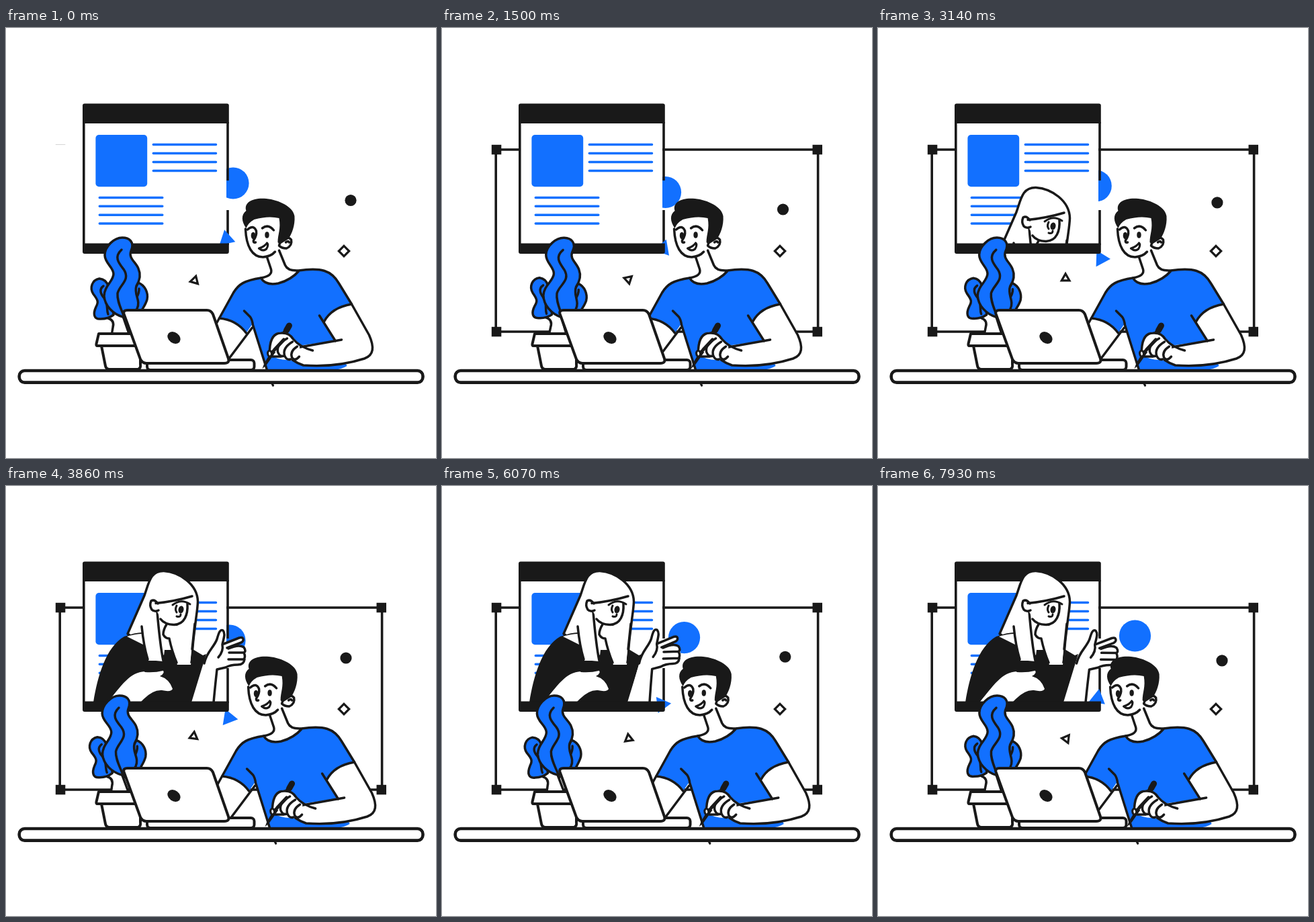
Write an HTML page with a canvas that moves like this. It is 640 px wide and 640 px high and loops after 8 s.

```html
<!DOCTYPE html>
<html lang="en">
<head>
<meta charset="utf-8">
<title>Video call at a desk</title>
<style>
  html, body { margin: 0; width: 100%; height: 100%; overflow: hidden; background: #fff; }
  canvas { display: block; width: 100vmin; height: 100vmin; margin: auto; }
</style>
</head>
<body>
<canvas id="stage"></canvas>
<script>
const BLUE = '#1270ff', INK = '#191919', WHITE = '#fff';
const LOOP = 8000, SIZE = 640;
const canvas = document.getElementById('stage');
const ctx = canvas.getContext('2d');

function shape(d, fill, line, width = 3.5) {
  const p = new Path2D(d);
  if (fill) { ctx.fillStyle = fill; ctx.fill(p); }
  if (line) { ctx.strokeStyle = line; ctx.lineWidth = width; ctx.stroke(p); }
}
const ink = (d, width) => shape(d, null, INK, width);
function box(x, y, w, h, r, fill, line, width) {
  ctx.beginPath();
  ctx.roundRect(x, y, w, h, r);
  if (fill) { ctx.fillStyle = fill; ctx.fill(); }
  if (line) { ctx.strokeStyle = line; ctx.lineWidth = width; ctx.stroke(); }
}
function oval(x, y, rx, ry, fill, turn = 0) {
  ctx.beginPath();
  ctx.ellipse(x, y, rx, ry, turn, 0, Math.PI * 2);
  ctx.fillStyle = fill;
  ctx.fill();
}
function triangle(x, y, r, deg) {
  ctx.beginPath();
  for (let i = 0; i < 3; i++) {
    const a = (deg + i * 120) * Math.PI / 180;
    ctx.lineTo(x + r * Math.cos(a), y + r * Math.sin(a));
  }
  ctx.closePath();
}
function group(draw) { ctx.save(); draw(); ctx.restore(); }
function rotateAbout(x, y, angle) {
  ctx.translate(x, y);
  ctx.rotate(angle);
  ctx.translate(-x, -y);
}

const clamp = (v) => Math.min(1, Math.max(0, v));
const easeInOut = (u) => u < 0.5 ? 2 * u * u : 1 - 2 * (1 - u) * (1 - u);

// Smooth curve through [time, value, ...] keys
function track(keys, t) {
  const last = keys.length - 1;
  let i = 0;
  while (i < last - 1 && t > keys[i + 1][0]) i++;
  const slope = (k, c) => {
    const a = keys[Math.max(0, k - 1)], b = keys[Math.min(last, k + 1)];
    return (b[c] - a[c]) / (b[0] - a[0]);
  };
  const a = keys[i], b = keys[i + 1], span = b[0] - a[0], u = (t - a[0]) / span;
  const u2 = u * u, u3 = u2 * u;
  return a.slice(1).map((v, j) => {
    const c = j + 1;
    return (2 * u3 - 3 * u2 + 1) * v + (u3 - 2 * u2 + u) * span * slope(i, c)
      + (3 * u2 - 2 * u3) * b[c] + (u3 - u2) * span * slope(i + 1, c);
  });
}

const DISC = [[0, 338, 231], [0.86, 335.5, 239], [1.5, 332.5, 244.5], [2.29, 326, 243],
  [2.9, 322.5, 237], [3.86, 333, 230], [5.21, 350, 227], [6.86, 370, 224.5], [8, 383.3, 222.9]];
const DOT = [[0, 513, 256.5], [0.86, 510, 264.5], [1.5, 507.5, 270], [2.29, 505, 268.5],
  [3, 504.8, 261], [3.86, 506, 256], [5.21, 509, 254.5], [6.86, 512, 255], [8, 512, 260.2]];
const SPIN = [[0, 46], [1.5, 198], [2.29, 240], [3.86, 277], [5.21, 198], [6.86, 95], [8, 65]];
const WEDGE = [[0, 328, 314], [1.5, 329, 328], [2.29, 331.7, 337], [3.86, 331.5, 345],
  [5.21, 329, 330.7], [6.86, 326, 321], [8, 327, 315.6]];
const ARM = [[2.5, 0], [3.86, 0], [5.21, -1], [6.86, -3.5], [8, 1.2]];

function manShift(t) {
  const phase = (((t - 1.57) % 6.28) + 6.28) % 6.28;
  const u = Math.min(phase, 6.28 - phase) / 3.14;
  return -12 + 9.5 * (u + Math.sin(u * Math.PI / 2));
}
function plantSway(t) {
  if (t < 2.33) return 6 * t;
  if (t < 4.7) return 14 - 28.6 * (t - 2.33) / 2.37;
  return -14.6 + 5.9 * (t - 4.7);
}

function selection(t) {
  const y = 174.1 + 290 * easeInOut(clamp(t / 0.82));
  group(() => {
    ctx.beginPath();
    ctx.moveTo(60, 160); ctx.lineTo(580, 160);
    ctx.lineTo(580, y - 2); ctx.lineTo(60, y);
    ctx.clip();
    ctx.strokeStyle = INK;
    ctx.lineWidth = 3.6;
    ctx.strokeRect(80.2, 181, 479.4, 271);
    ctx.fillStyle = INK;
    for (const x of [73.8, 551.5])
      for (const top of [173.8, 444.8]) ctx.fillRect(x, top, 14.5, 14.5);
  });
}

function page() {
  ctx.fillStyle = WHITE;
  ctx.fillRect(115, 130, 213, 195);
  ctx.fillStyle = INK;
  ctx.fillRect(114, 140, 3.6, 185);
  ctx.fillRect(328.2, 140, 3.6, 87);
  ctx.fillRect(328.2, 271, 3.6, 52);
  box(114, 112.5, 217.8, 29.5, [3, 3, 0, 0], INK);
  box(133.4, 159, 76.8, 77.2, 5, BLUE);
  for (let i = 0; i < 4; i++) {
    const a = 173.5 + i * 13, b = 252.4 + i * 12.9;
    shape(`M219.3 ${a}H312.5M139.3 ${b}H232.8`, null, BLUE);
  }
}

function woman(t) {
  if (t < 2.57) return;
  const drop = 195 * (1 - easeInOut(clamp((t - 2.57) / 1.23)));
  group(() => {
    ctx.beginPath();
    ctx.rect(0, 0, SIZE, 321);
    ctx.clip();
    ctx.translate(0, drop);

    // back hair, then the top
    shape('M181 220L206 163C213 143 215 126 235 126.500C258 128 285 146 285.500 172C285 190 280 205 276 262L250 262L210 240Z', WHITE, INK);
    shape('M130 322C136 285 148 240 176 224Q192 218 203 218L212 260L234 260L236 244L246 244L255 266H275L278 243L293 252L298 250L276 322Z', INK);
    shape('M180 224Q193 220 203 220L206 237Z', WHITE);
    shape('M202 208C204 228 207 244 212 259L234 261C230 240 228 220 225 187L240 206L234 221L243 227Q247 248 255 265.500H274L280 205L271 185L226 173L206 180Z', WHITE);
    ink('M202 209C204 229 206 242 211 258M225 187C228 222 230 240 234 260M281 205L277 243');
    ink('M239 206Q234 214 234 221Q237 227 243 227Q247 246 254 263');

    // face
    shape('M224 174L273 166C273 190 268 207 249 207Q235 206 230 197L225 187Z', WHITE);
    ink('M230 198Q236 206 250 206.500C266 206 271 191 270 175');
    shape('M226 175Q221 168 216 171Q213 178 217 184Q221 188 227 185', WHITE, INK);
    ink('M223 174.500Q250 172 277 164');
    ink('M248 177Q261 167 274 176M254 178Q251 184 254 188', 3);
    oval(260.5, 184, 4, 5.6, INK, 0.2);
    ink('M254 194Q260 196 260 191', 3);

    // folded arm
    shape('M152 321C172 297 184 277 207 276Q222 277 233 274Q238 278 229 283Q243 287 248 302Q246 307 232 304Q219 303 205 317L201 321Z', WHITE);
    ink('M207 276Q222 277 233 274', 2);

    // raised arm
    group(() => {
      const [lean] = track(ARM, t);
      rotateAbout(292, 321, lean / 100);
      shape('M277 322L295 264C299 246 309 241 314 228C317 217 319 213 323 215C327 220 324 226 323 234L347 226C354 224 355 230 350 233L333 240L349 237Q356 238 356 244Q358 250 356 261Q354 266 346 266Q334 266 327 270L314 273L309 322Z', WHITE);
      ink('M295 264C299 246 309 241 314 228C317 217 319 213 323 215C327 220 324 226 322 236Q324 246 316 255');
      ink('M324 235L347 226C354 224 355 230 350 233L329 241M331 242Q347 235 354 240Q358 246 354 248H332M354 248Q357 254 354 258L331 258M355 258Q354 266 345 266Q334 266 327 270L314 273Q311 300 309 322');
    });
  });
}

function plant(t) {
  group(() => {
    rotateAbout(170, 500, plantSway(t) / 188);
    shape('M152 431Q162 434 159 446L158 458H184L174 426Z', WHITE);
    ink('M152 432Q162 435 159 446L157 458M173 426L184 458');
    shape('M197 379C207 383 212 394 210 404C207 415 200 420 197 432L180 430L188 395Z', BLUE, INK);
    ink('M198 388C199 401 188 404 190 418');
    shape('M139 373C128 375 124 387 130 396C137 405 138 408 134 415C129 426 131 434 141 433Q152 433 160 427L158 395L152 384Q149 374 139 373Z', BLUE, INK);
    ink('M145 384C138 389 141 396 146 402C153 412 149 419 152 426');
    shape('M173 312C161 312 147 325 147 338C147 350 160 356 160 366C160 377 146 384 146 399C147 413 159 426 174 430Q189 427 195 418C201 405 190 397 194 384C199 376 201 367 197 358C193 348 182 343 186 332C192 318 183 312 173 312Z', BLUE, INK);
    ink('M172 330C160 341 168 350 175 359C186 375 169 382 166 395C165 408 173 420 177 434');
  });
  shape('M142 473L148 503Q149 508 154 508H196Q201 507 200 500V473Z', WHITE, INK, 4);
  shape('M138 455H200V473H136Q134 473 134.500 470Z', WHITE, INK, 4);
}

function laptop() {
  box(210, 494, 159.500, 15, 5, WHITE, INK, 4);
  shape('M181 420H299Q305 420 308 426L331 492Q333 499 325 499H209Q203 499 200 493L176 427Q173 420 181 420Z', WHITE, INK, 4);
  oval(250, 461, 10.5, 8, INK, 0.65);
}

function body() {
  // neck and far arm
  shape('M389 340L396 361Q396 369 381 373L405 388L437 361Q422 362 418 355L407 328Z', WHITE);
  shape('M318 432Q345 436 358 454L368 446L331 494L300 470Z', WHITE);
  ink('M318 432L308 450M367 446L331 494');

  // shirt
  shape('M380 372C355 376 347 381 339 394L318 432C339 434 350 443 358 454L367 441L388 509H488Q500 508 508 503L491 466L474 437Q485 416 515 411L496 380C485 361 470 356 436 361Q425 374 410 380Q388 385 380 372Z', BLUE);
  ink('M380 372C355 376 347 381 339 394L318 432C339 434 350 443 358 454M355 421L364 430Q367 434 368 442L389 509');
  ink('M389 341L395 359Q398 369 380 372Q387 384 406 380Q425 375 437 361M407 331L416 353Q420 362 436 361C470 356 485 361 496 380L515 411');

  // near arm and hand
  shape('M393 486C390 472 397 455 409 454C420 453 427 464 436 473L500 464L491 466L474 437Q485 416 515 411L541 457C549 475 548 487 534 492C503 502 470 504 443 502C430 500 430 494 420 494Q404 494 393 486Z', WHITE);
  ink('M515 411Q485 416 474 437M467 428L491 466M515 411L541 457C549 475 548 487 534 492C503 502 470 504 443 502Q434 499 427 494M500 464L438 475');

  // pen
  ink('M422 443L418 450', 9);
  shape('M414 449L420 453L409 472L388 502L382 507L385 499Z', INK);
  shape('M392 489Q388 484 392 480Q396 480 396 486Q394 490 392 489Z', WHITE, INK, 3);
  shape('M396 478C395 464 401 454 411 454Q422 454 428 464L438 475L429 492L411 491L404 484Z', WHITE);
  ink('M393 478C394 462 400 454 410 454Q422 453 428 463Q438 475 457 480M397 489L410 489');
  ink('M419 462Q403 471 405 482Q408 490 414 488M427 467Q412 476 415 487Q418 495 424 493M434 474Q423 481 426 490Q430 497 437 489');
  ink('M414 464L400 479', 5);
}

function head() {
  shape('M357 292C359 322 366 341 384 341Q399 340 406 327L411 312L407 282L368 280Z', WHITE);
  shape('M410 314Q420 309 425 315Q427 324 418 328Q411 328 407 324Z', WHITE, INK);
  ink('M357 299C358 325 367 341 383 341Q395 340 401 333M417 319Q421 316 422 319', 3.5);
  shape('M358 298C351 288 350 278 358 272C354 259 369 252 388 254C407 256 428 266 430 280C431 294 426 306 421 314L408 322L405 319C405 307 410 299 407 283Q391 279 370 285Q361 290 358 298Z', INK);
  ink('M360 300Q369 292 373 302Q374 309 369 316Q368 320 372 319M382 298Q391 291 399 301', 3.5);
  oval(368.500, 309, 3.3, 5.2, INK);
  oval(389, 308, 3.2, 4.7, INK);
  shape('M377 328Q386 325 389 320Q392 323 388 329Q383 333 377 328Z', WHITE, INK, 3.2);
}

function man(t) {
  group(() => {
    ctx.translate(manShift(t), 0);
    body();
    head();
    ink('M396 528L398 532', 3.2);
  });
}

function floaters(t, spin) {
  const [x, y] = track(DOT, t);
  oval(x, y, 8.6, 8.6, INK);
  ctx.save();
  ctx.lineJoin = 'miter';
  ctx.strokeStyle = INK;
  ctx.lineWidth = 3.2;
  ctx.stroke(new Path2D('M503 324.300L510.700 332L503 339.700L495.300 332Z'));
  const a = (spin - 5) * Math.PI / 180;
  triangle(279.3 + 2 * Math.cos(a), 374.5 + 2 * Math.sin(a), 6.7, spin);
  ctx.stroke();
  ctx.restore();
}

function draw(t) {
  const ratio = canvas.width / SIZE;
  ctx.setTransform(ratio, 0, 0, ratio, 0, 0);
  ctx.fillStyle = WHITE;
  ctx.fillRect(0, 0, SIZE, SIZE);
  ctx.lineCap = ctx.lineJoin = 'round';

  const [spin] = track(SPIN, t);
  const [dx, dy] = track(DISC, t);
  const [wx, wy] = track(WEDGE, t);
  selection(t);
  oval(dx, dy, 23.6, 23.6, BLUE);
  page();
  woman(t);
  triangle(wx, wy, 14, spin - 28);
  ctx.fillStyle = BLUE;
  ctx.fill();
  box(114, 320.5, 217.8, 15.5, [0, 0, 3, 3], INK);
  floaters(t, spin);
  man(t);
  plant(t);
  laptop();
  box(19.700, 510, 600.800, 17.600, 8, WHITE, INK, 4.6);
}

function resize() {
  const side = Math.min(innerWidth, innerHeight) || SIZE;
  canvas.width = canvas.height = Math.round(side * (devicePixelRatio || 1));
}
function tick() {
  draw((performance.now() % LOOP) / 1000);
  requestAnimationFrame(tick);
}
addEventListener('resize', resize);
resize();
tick();
</script>
</body>
</html>
```
